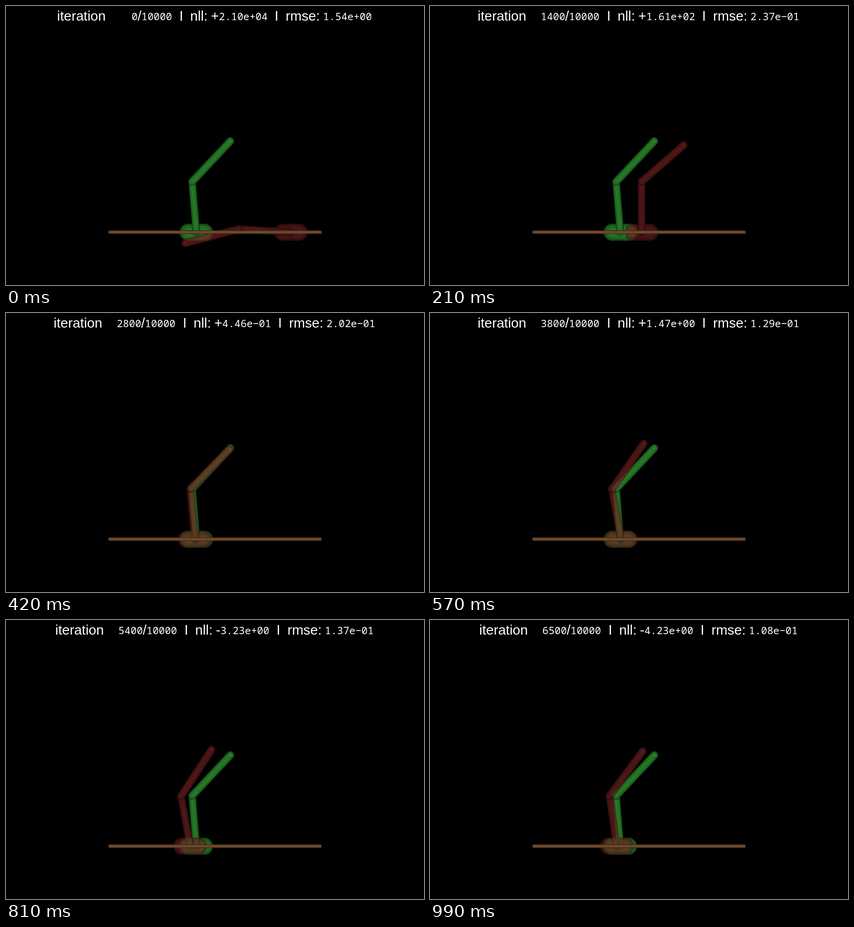
An HTML page with a canvas that plays this animation: 917 by 611 pixels, repeating every 2.02 s.

```html
<!DOCTYPE html>
<html lang="en">
<head>
<meta charset="utf-8">
<title>Cart and double pole fit</title>
<style>
html, body { margin: 0; width: 100%; height: 100%; overflow: hidden; background: #000; }
canvas { display: block; }
</style>
</head>
<body>
<canvas id="stage" width="917" height="611"></canvas>
<script>
const stage = document.getElementById("stage");
const ctx = stage.getContext("2d");
const layer = document.createElement("canvas");
layer.width = stage.width;
layer.height = stage.height;
const layerCtx = layer.getContext("2d");

const LOOP = 2020, STEP = 30, LAST = 33;
const RAIL_Y = 495.5;
const SANS = "30px 'Liberation Sans', Arial, sans-serif";
const BAR = "bold 22px 'Liberation Sans', Arial, sans-serif";
const MONO = "22.3px 'Noto Sans Mono', monospace";

const GREEN = [38, 122, 40], RED = [122, 36, 38], BROWN = [116, 75, 45];
const TRUTH = { x: 417.5, a: -4.7, b: 43.3 };

// Step, cart x, lower and upper pole angle (degrees from upright), nll, rmse
const KEYS = [
  [0, 625.5, -86.5, -104.8, 2.1e4, 1.54],
  [3, 442, -23.8, 6.6, 1.43e3, 0.508],
  [7, 464.3, 0, 49.2, 161, 0.237],
  [14, 414, -5.1, 45, 0.446, 0.202],
  [19, 419, -10.4, 34.9, 1.47, 0.129],
  [27, 404, -10.4, 33.2, -3.23, 0.137],
  [33, 409.5, -8.1, 36.6, -4.23, 0.108]
];

const lerp = (a, b, u) => a + (b - a) * u;

function stateAt(step) {
  let i = 0;
  while (i < KEYS.length - 2 && step >= KEYS[i + 1][0]) i++;
  const p = KEYS[i], q = KEYS[i + 1];
  const u = (step - p[0]) / (q[0] - p[0]);
  const mix = j => lerp(p[j], q[j], u);
  return {
    x: mix(1), a: mix(2), b: mix(3),
    nll: Math.sinh(lerp(Math.asinh(p[4]), Math.asinh(q[4]), u)),
    rmse: Math.exp(lerp(Math.log(p[5]), Math.log(q[5]), u))
  };
}

// Round-ended rod, shaded darker towards its rim
function rod(c, x1, y1, x2, y2, width, color) {
  c.lineCap = "round";
  for (let w = width; w > 0; w -= 1) {
    const u = w / width;
    const light = 0.32 + 0.68 * Math.sqrt(1 - u * u);
    c.strokeStyle = `rgb(${color.map(v => Math.round(v * light))})`;
    c.lineWidth = w;
    c.beginPath();
    c.moveTo(x1, y1);
    c.lineTo(x2, y2);
    c.stroke();
  }
}

function drawCart(c, { x, a, b }, color) {
  const rad = Math.PI / 180;
  const sa = Math.sin(a * rad), ca = Math.cos(a * rad);
  const lower = 111 + 4 * sa * sa, upper = 122;
  const hx = x + lower * sa, hy = RAIL_Y - lower * ca;
  const tx = hx + upper * Math.sin(b * rad), ty = hy - upper * Math.cos(b * rad);
  rod(c, x - 18, RAIL_Y, x + 18, RAIL_Y, 38, color);
  rod(c, x, RAIL_Y, hx, hy, 16.5, color);
  rod(c, hx, hy, tx, ty, 17.5, color);
  c.fillStyle = "rgba(255,255,255,0.15)";
  c.beginPath();
  c.arc(tx, ty, 1.8, 0, 7);
  c.fill();
}

function write(text, x, font, y) {
  ctx.font = font;
  ctx.fillText(text, x, y);
  return x + ctx.measureText(text).width;
}

const sans = (text, x) => write(text, x, SANS, 32);
const mono = (text, x) => write(text, x, MONO, 31);
const bar = x => write("|", x, BAR, 27);

function writeNumber(value, x) {
  const [mantissa, exp] = value.toExponential(2).split("e");
  const sign = exp[0] === "-" ? "\u2212" : "+";
  mono(mantissa + "e" + sign + exp.slice(1).padStart(2, "0"), x);
}

function drawTitle(iteration, nll, rmse) {
  const digits = String(iteration);
  const pad = 4 - digits.length;
  const negative = nll < 0;
  const short = 5 * pad;
  const cut = short + (negative ? 7 : 0);
  const left = 458.5 - (705 - cut) / 2;
  ctx.fillStyle = "#fff";
  sans("iteration", left - 1.5);
  mono("10000", sans("/", mono(digits, left + 137 + pad * 8.3)));
  bar(left + 283 - short);
  sans("nll:", left + 305.5 - short);
  writeNumber(Math.abs(nll), sans(negative ? "-" : "+", left + 351 - short));
  bar(left + 492 - cut);
  sans("rmse:", left + 515 - cut);
  writeNumber(rmse, left + 597 - cut);
}

function draw(step) {
  const state = stateAt(step);
  ctx.fillStyle = "#000";
  ctx.fillRect(0, 0, stage.width, stage.height);
  drawCart(ctx, TRUTH, GREEN);

  layerCtx.clearRect(0, 0, layer.width, layer.height);
  drawCart(layerCtx, state, RED);
  ctx.globalAlpha = 0.65;
  ctx.drawImage(layer, 0, 0);
  ctx.globalAlpha = 1;

  rod(ctx, 228, 495.2, 689, 495.2, 8, BROWN);
  drawTitle(step < LAST ? step * 200 : 6500, state.nll, state.rmse);
}

const start = performance.now();
function tick() {
  const t = (performance.now() - start) % LOOP;
  draw(Math.min(LAST, Math.floor(t / STEP)));
  requestAnimationFrame(tick);
}
tick();
</script>
</body>
</html>
```
